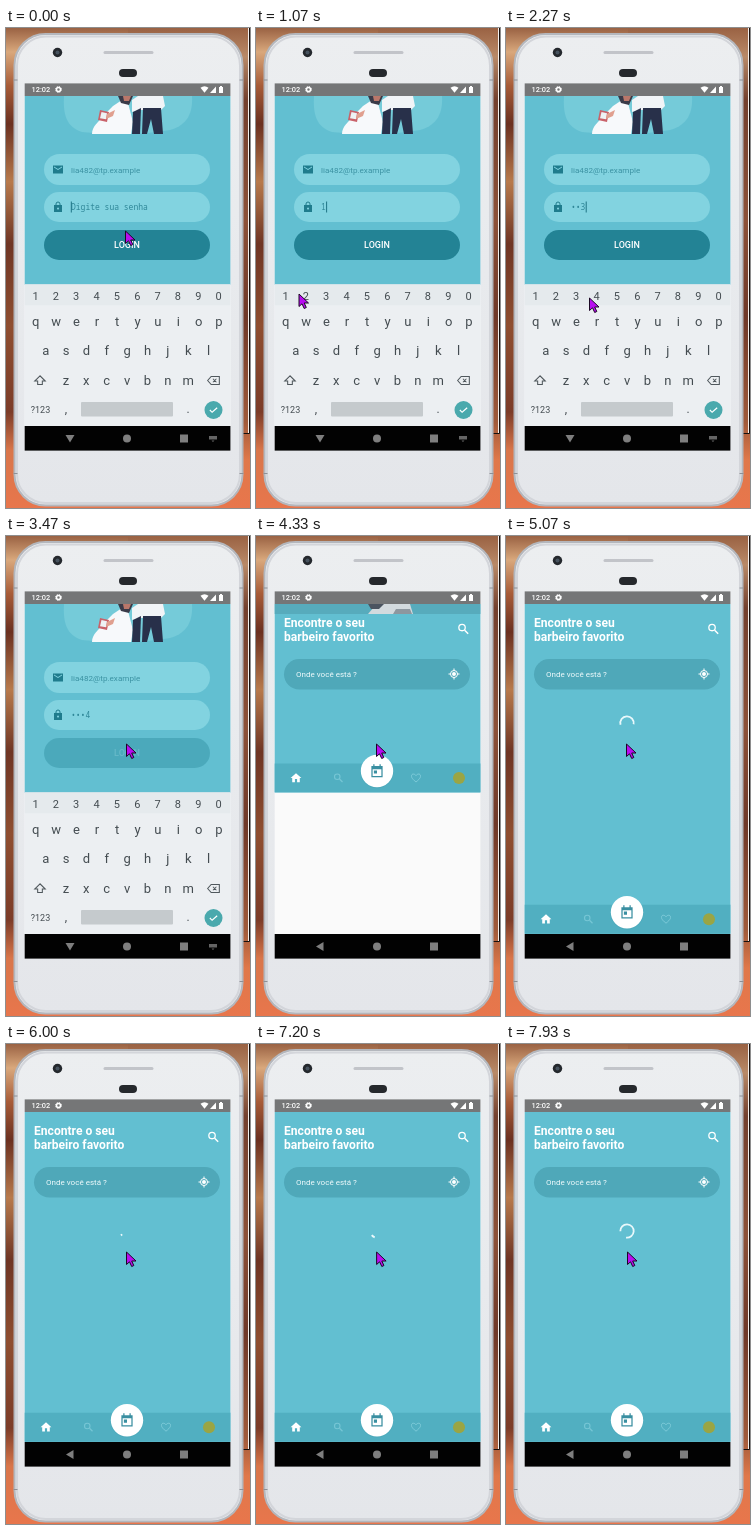
These frames come from a looping animation (244x480 px, 8000 ms). An HTML page:

```html
<!DOCTYPE html>
<html lang="pt">
<head>
<meta charset="utf-8">
<title>Login</title>
<style>
html, body { margin: 0; width: 100%; height: 100%; overflow: hidden; background: #8b4a2c; }
svg { display: block; width: 244px; height: 480px; font-family: Roboto, "Noto Sans", sans-serif; }
.mono { font: 8px "Noto Sans Mono", "DejaVu Sans Mono", monospace; }
.mid { text-anchor: middle; }
</style>
</head>
<body>
<svg id="stage" viewBox="0 0 244 480">
  <defs>
    <linearGradient id="left" x2="0" y2="1">
      <stop offset="0" stop-color="#9a6243"/><stop offset=".05" stop-color="#d9a87c"/>
      <stop offset=".12" stop-color="#a85c38"/><stop offset=".2" stop-color="#6b3020"/>
      <stop offset=".32" stop-color="#b87a4c"/><stop offset=".45" stop-color="#6f3524"/>
      <stop offset=".62" stop-color="#8f4e30"/><stop offset=".8" stop-color="#7c3c28"/>
      <stop offset=".88" stop-color="#d9764a"/><stop offset="1" stop-color="#e8764c"/>
    </linearGradient>
    <linearGradient id="right" x2="0" y2="1">
      <stop offset="0" stop-color="#9a6243"/><stop offset=".06" stop-color="#b98a68"/>
      <stop offset=".15" stop-color="#74402e"/><stop offset=".4" stop-color="#8d5138"/>
      <stop offset=".6" stop-color="#6f3828"/><stop offset=".82" stop-color="#a05a3a"/>
      <stop offset=".9" stop-color="#e0784a"/><stop offset="1" stop-color="#e8764c"/>
    </linearGradient>
    <linearGradient id="body" x2="0" y2="1">
      <stop offset="0" stop-color="#eceef0"/><stop offset="1" stop-color="#e4e6ea"/>
    </linearGradient>
    <clipPath id="screen"><path d="M18.700 68h205.700v330H18.700z"/></clipPath>
  </defs>

  <path d="M0 0h122v480H0z" fill="url(#left)"/>
  <path d="M122 0h122v480H122z" fill="url(#right)"/>
  <path d="M242.500 0v405" stroke="#f4f1ef"/>
  <path d="M243.500 0v405.500h-8" fill="none" stroke="#17100e"/>

  <rect x="8.500" y="6" width="228" height="471.500" rx="31" fill="url(#body)" stroke="#b4b7bd" stroke-width="2"/>
  <rect x="11" y="8.500" width="223" height="466.500" rx="29" fill="none" stroke="#d3d5da" stroke-width="2"/>
  <path d="M7.500 52h4M233.500 52h4M7.500 445.500h4M233.500 445.500h4" stroke="#8e9197"/>
  <circle cx="51.500" cy="24.500" r="4.700" fill="#24282d"/><circle cx="51.500" cy="24.500" r="2" fill="#46525e"/>
  <rect x="97.500" y="23" width="50" height="3" rx="1.500" fill="#c2c4c9"/>
  <rect x="113" y="41" width="18" height="8" rx="4" fill="#25282c"/>

  <rect x="18.700" y="68" width="205.700" height="330" fill="#fafafa"/>
  <g clip-path="url(#screen)">
    <g id="login"></g>
    <g id="home"></g>
  </g>

  <rect x="18.700" y="55.400" width="205.700" height="12.600" fill="#757677"/>
  <text x="25.500" y="64.300" font-size="7.400" font-weight="500" fill="#fff">12:02</text>
  <circle cx="52.500" cy="61.500" r="2" fill="none" stroke="#fff" stroke-width="1.500"/>
  <circle cx="52.500" cy="61.500" r="3" fill="none" stroke="#fff" stroke-dasharray="1.2 1.16"/>
  <path d="M194.500 59.800q4-3 8 0l-4 5zM204 65h6v-6.500zM213 59h1v-1h2v1h1v6h-4z" fill="#fff"/>

  <rect x="18.700" y="398" width="205.700" height="24.600" fill="#020202"/>
  <g fill="#7e7e7e">
    <path id="back" d="M59.500 407h9l-4.500 7.500z"/>
    <circle cx="121" cy="410.500" r="4"/>
    <path d="M174 406.500h8v8h-8z"/>
    <path id="hide" d="M203 408h8v3.500h-8zM205.500 412.500h3l-1.500 1.500z" opacity=".8"/>
  </g>

  <path id="pointer" d="M0 0V12.500L3 9.800 5.200 14.500 7.300 13.500 5.200 9H9.500z" fill="#b80cf0" stroke="#1b0824"/>
</svg>
<script>
const $ = id => document.getElementById(id);
const LOOP = 8000, TEAL = '#62bfd1';

const icons = {
  home: '<path d="M10 20v-6h4v6h5v-8h3L12 3 2 12h3v8z"/>',
  search: '<path d="M14 14l6 6" fill="none" stroke="currentColor" stroke-width="2.500"/><circle cx="9.500" cy="9.500" r="5.500" fill="none" stroke="currentColor" stroke-width="2.200"/>',
  heart: '<path d="M12 20C2 12 3 9 3 8 3 3 9 3 12 7 15 3 21 3 21 8 21 9 22 12 12 20z" fill="none" stroke="currentColor" stroke-width="2"/>',
  calendar: '<path fill-rule="evenodd" d="M3 4h3V1h2v3h8V1h2v3h3v18H3zM5 9v11h14V9zM7 11h5v5H7z"/>',
  locate: '<circle cx="12" cy="12" r="7" fill="none" stroke="currentColor" stroke-width="2"/><circle cx="12" cy="12" r="4"/><path d="M11 1h2v4h-2zM11 19h2v4h-2zM1 11h4v2H1zM19 11h4v2h-4z"/>',
  mail: '<path fill-rule="evenodd" d="M2 4h20v16H2zM4 6v2l8 5 8-5V6l-8 5z"/>',
  lock: '<path fill-rule="evenodd" d="M4 8h16v14H4zM12 13a2 2 0 1 0 .1 0z"/><path d="M8 9V6a4 4 0 0 1 8 0v3" fill="none" stroke="currentColor" stroke-width="2"/>',
  shift: '<path d="M12 4L3 13h5v6h8v-6h5z" fill="none" stroke="currentColor" stroke-width="1.800"/>',
  erase: '<path d="M8 5h14v14H8l-6-7zM11 9l6 6M17 9l-6 6" fill="none" stroke="currentColor" stroke-width="1.800"/>',
  check: '<path d="M4 12l5 5L20 7" fill="none" stroke="currentColor" stroke-width="2.500"/>'
};
const icon = (name, x, y, size, color, alpha = 1) =>
  `<g transform="translate(${x - size / 2} ${y - size / 2}) scale(${size / 24})" fill="${color}" color="${color}" opacity="${alpha}">${icons[name]}</g>`;
const pill = (x, y, w, h, fill) =>
  `<rect x="${x}" y="${y}" width="${w}" height="${h}" rx="${h / 2}" fill="${fill}"/>`;
const keyRow = (chars, x, y, size) => [...chars].map((c, i) =>
  `<text class="mid" x="${x + i * 20.35}" y="${y}" font-size="${size}">${c}</text>`).join('');

const keyboard = `
  <rect x="18" y="256.400" width="207" height="142" fill="#eceff2"/>
  <rect x="18" y="256.400" width="207" height="21" fill="#e5eaed"/>
  <g fill="#444c51">
    ${keyRow('1234567890', 29.5, 272, 11)}${keyRow('qwertyuiop', 29.8, 298, 13)}
    ${keyRow('asdfghjkl', 39.8, 327, 13)}${keyRow('zxcvbnm', 60, 356.5, 13)}
    <text class="mid" x="34.500" y="384.500" font-size="9">?123</text>
    <text class="mid" x="60" y="385" font-size="12">,</text>
    <text class="mid" x="182" y="385" font-size="12">.</text>
  </g>
  ${icon('shift', 34, 352.5, 14, '#50585d')}${icon('erase', 207.5, 352.5, 14, '#50585d')}
  <rect x="75" y="374" width="92" height="14.500" rx="1" fill="#c5cacd"/>
  <circle cx="207.500" cy="382" r="9" fill="#4aa9ad"/>${icon('check', 207.5, 382, 11, '#fff')}`;

const picture = `
  <path d="M58 68h128c1 16-4 29-22 34-35 6-66 4-88 2C60 99 57 86 58 68z" fill="#75cbd9"/>
  <path d="M86 106c0-8 7-12 11-18l10-10 9-6 6 3 5 19-2 12z" fill="#f7f9fb"/>
  <path d="M112 68h15l-4 9-8-2z" fill="#3a3a48"/>
  <path d="M117 68h8l-2 5h-5z" fill="#b9776a"/>
  <path d="M126 72l6-4h25l2 10-4 4h-20l-9 2z" fill="#f1f4f7"/>
  <path d="M127 84l8-4-1 26h-8z" fill="#28304a"/>
  <path d="M137 80h18l2 26h-9l-3-15-4 15h-5z" fill="#28304a"/>
  <path d="M94 82l9 2-2 10-9-2z" fill="#c9626a"/>
  <path d="M95.500 84l5.500 1.200-1 6-6-1z" fill="#eef2f5"/>
  <path d="M101 86l8-4-2 6-7 3z" fill="#e0a08f"/>`;

$('login').innerHTML = `
  <rect x="18" y="68" width="207" height="189" fill="${TEAL}"/>${picture}
  ${pill(38, 126, 166, 31, '#82d3e0')}${pill(38, 164, 166, 30, '#82d3e0')}
  ${icon('mail', 52, 141.5, 12, '#1f7c8d')}${icon('lock', 52, 179, 12, '#1f7c8d')}
  <text x="65" y="144.500" font-size="8.100" fill="#3c93a3">lia482@tp.example</text>
  <text id="password" class="mono" x="65" y="182" fill="#2f8798"></text>
  <rect id="caret" y="173.500" width="1" height="11" fill="#1f7485"/>
  <g id="button">${pill(38, 202, 166, 30, '#238395')}
    <text id="label" class="mid" x="121" y="220.300" font-size="9" font-weight="500" fill="#fff">LOGIN</text></g>
  ${keyboard}`;

$('home').innerHTML = `
  <rect id="page" x="18" y="68" width="207" height="188.400" fill="${TEAL}"/>
  <g id="remnant"><path d="M18 68h207v10H18z" fill="#57abbc"/>
    <path d="M112 78l6-7 9-3h27l3 10z" fill="#d3dade"/>
    <path d="M112 68h16l-5 5h-8z" fill="#4b5460"/>
    <path d="M137 78l3-5h14l2 5z" fill="#8d979f"/></g>
  <g font-size="12.100" font-weight="700" fill="#fff">
    <text x="28" y="90.500">Encontre o seu</text><text x="28" y="104.500">barbeiro favorito</text></g>
  ${icon('search', 207.5, 93, 14, '#fff')}
  ${pill(28, 123, 186, 30.5, '#4fa8b9')}
  <text x="40" y="141" font-size="8.050" fill="#eefafc">Onde você está ?</text>
  ${icon('locate', 198, 138, 12, '#fff')}
  <path id="spinner" fill="none" stroke="#e8f8fb" stroke-width="1.800"/>
  <g id="tabs"><rect x="18" y="227.500" width="207" height="28.900" fill="#51afc1"/>
    ${icon('home', 40, 242, 13, '#fff')}${icon('search', 82.5, 242, 12, '#8fd5e2', .6)}
    <circle cx="121" cy="235.700" r="16.500" fill="#3f9bad" opacity=".35"/>
    <circle cx="121" cy="235" r="16.200" fill="#fff"/>${icon('calendar', 121, 235, 15, '#3a8fa1')}
    ${icon('heart', 160, 242, 12, '#8fd5e2', .7)}
    <circle cx="203" cy="242" r="6" fill="#9aa544"/></g>`;

const clamp = v => Math.max(0, Math.min(1, v));
const smooth = v => v * v * (3 - 2 * v);
const ramp = (t, a, b) => smooth(clamp((t - a) / (b - a)));

// time, x, y of the pointer tip
const route = [
  [70, 119.5, 203], [820, 28, 268], [940, 29, 268], [1070, 43, 266], [1220, 50, 268],
  [1750, 51, 268], [2020, 69, 269], [2150, 70, 269], [2270, 83.5, 270], [2420, 90, 270],
  [2700, 90, 270], [3050, 120.5, 208], [7000, 120.5, 208], [7930, 121.5, 208]
];
function pointerAt(t) {
  const i = route.findIndex(p => p[0] > t);
  if (i < 1) return i ? route.at(-1).slice(1) : route[0].slice(1);
  const [a, b] = [route[i - 1], route[i]], k = ramp(t, a[0], b[0]);
  return [1, 2].map(n => a[n] + (b[n] - a[n]) * k);
}

const strokes = [930, 1550, 2130, 2670];
function drawPassword(t) {
  const n = strokes.filter(s => s <= t).length;
  const last = n ? strokes[n - 1] : 0;
  $('password').textContent = n ? '•'.repeat(n - 1) + n : 'Digite sua senha';
  $('caret').setAttribute('x', 64.8 + n * 4.8 + (n ? .5 : 0));
  show('caret', (t - last) % 1000 < 500 && t < 3170);
}

function show(id, on) { $(id).style.display = on ? '' : 'none'; }

// The head sweeps 3/4 turn, then the tail catches up, while both drift 1/4 turn.
function drawSpinner(t) {
  show('spinner', t > 4700);
  const cycles = (t - 4640) / 1333, n = Math.floor(cycles), p = cycles - n;
  const base = 135 + 90 * cycles + 270 * n;
  const tail = base + 270 * ramp(p, .5, 1);
  const head = base + 270 * ramp(p, 0, .5) + 14;
  const at = deg => {
    const a = deg * Math.PI / 180;
    return `${121 + 6.7 * Math.cos(a)} ${187 + 6.7 * Math.sin(a)}`;
  };
  $('spinner').setAttribute('d', `M${at(tail)}A6.7 6.7 0 ${+(head - tail > 180)} 1 ${at(head)}`);
}

function draw(t) {
  const inside = t >= 4070, tall = t >= 4900;
  show('login', !inside);
  show('home', inside);
  show('hide', !inside);
  $('back').setAttribute('transform', inside ? 'rotate(90 64 410.5)' : '');
  drawPassword(t);
  const pressed = ramp(t, 3200, 3350) - ramp(t, 3600, 3850);
  $('button').setAttribute('opacity', 1 - .65 * pressed);
  $('label').setAttribute('opacity', 1 - .65 * pressed);
  show('remnant', t < 4750);
  $('page').setAttribute('height', tall ? 330 : 188.4);
  $('tabs').setAttribute('transform', `translate(0 ${tall ? 141.2 : 0})`);
  drawSpinner(t);
  $('pointer').setAttribute('transform', `translate(${pointerAt(t)})`);
}

const start = performance.now();
(function tick() {
  draw((performance.now() - start) % LOOP);
  requestAnimationFrame(tick);
})();
</script>
</body>
</html>
```
